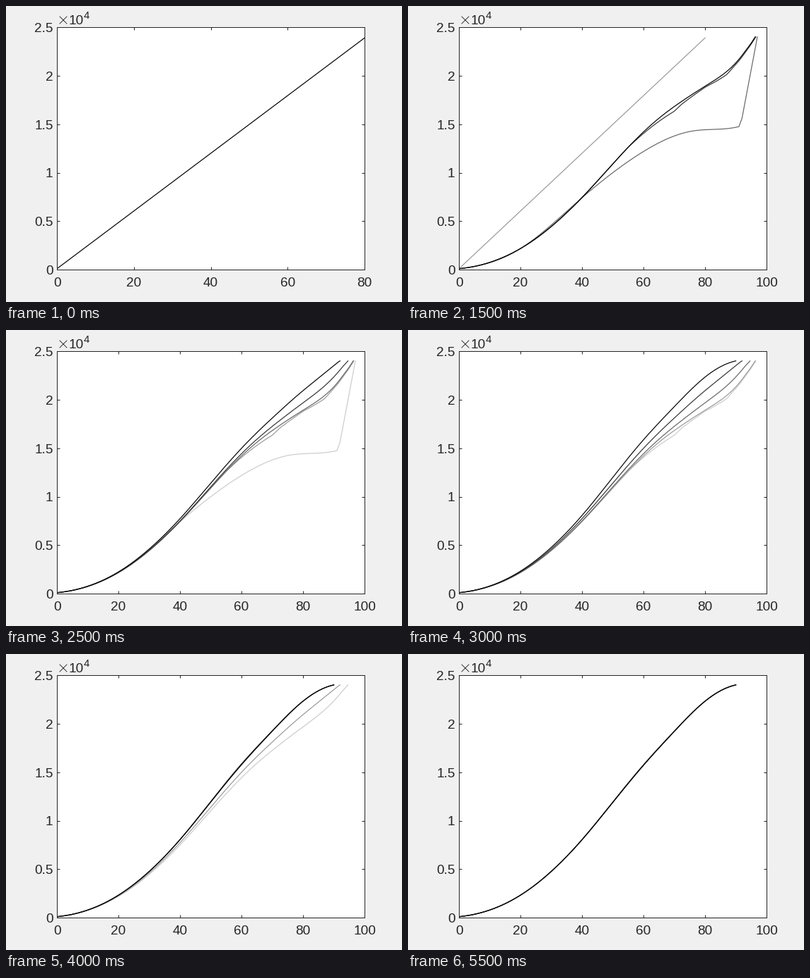
Write a matplotlib script that moves like this. It is 560x420 px and loops after 6 s.

```python
import numpy as np
import matplotlib.pyplot as plt
from matplotlib.animation import FuncAnimation
from matplotlib.lines import Line2D

W, H, DPI = 560, 420, 100
LEFT, RIGHT, TOP, BOTTOM = 72.1, 507.1, 30.1, 374.1
PX = 72 / DPI
INK = (0.15, 0.15, 0.15)
FADE = 0.2
FRAMES = 12

plt.rcParams["font.family"] = "Liberation Sans"


def spline(t, knots, first_slope, last_slope):
    """Cubic spline through (time, height / 1e4) knots with fixed end slopes."""
    x, y = np.array(knots, float).T
    h = np.diff(x)
    rise = np.diff(y) / h
    matrix = np.eye(len(x))
    rhs = np.full(len(x), first_slope)
    rhs[-1] = last_slope
    for j in range(1, len(x) - 1):
        matrix[j, j - 1:j + 2] = h[j], 2 * (h[j - 1] + h[j]), h[j - 1]
        rhs[j] = 3 * (h[j] * rise[j - 1] + h[j - 1] * rise[j])
    slope = np.linalg.solve(matrix, rhs)

    i = np.clip(np.searchsorted(x, t, side="right") - 1, 0, len(h) - 1)
    u = (t - x[i]) / h[i]
    v = 1 - u
    return (y[i] * v * v * (1 + 2 * u) + y[i + 1] * u * u * (3 - 2 * u)
            + h[i] * u * v * (slope[i] * v - slope[i + 1] * u))


def climb(end, lag=0, dip=0, lead=0):
    """Ideal climb, slowed by lag, sagging by dip near its end."""
    t = np.linspace(0, end, 400)
    ideal = [(0, 0.01), (20, 0.232), (40, 0.803), (50, 1.187),
             (60, 1.57), (70, 1.92), (80, 2.232), (90, 2.4)]
    y = spline(np.minimum(t * (1 - lag), 90), ideal, 0.003, 0.007)
    sag = dip * np.sin(np.pi * (t / end) ** 5.4)
    return t, y - sag + lead * np.exp(-((t - 58) / 14) ** 2)


def stalled():
    """Levels off halfway, then shoots straight up."""
    t = np.linspace(0, 91, 400)
    knots = [(0, 0.01), (20, 0.218), (40, 0.742), (50, 1.0),
             (60, 1.219), (76, 1.43), (91, 1.475)]
    y = spline(t, knots, 0.003, 0.008)
    return np.append(t, [92, 97]), np.append(y, [1.56, 2.4])


def notched():
    t, y = climb(96.5, 0.036, 0.285)
    notch = np.interp(t, [55, 70, 72.5, 80, 87, 89, 96],
                      [0, 0.05, 0.03, 0.012, 0.03, 0.015, 0])
    return t, y - notch


curves = [([0, 80], [0.01, 2.39]), stalled(), notched(),
          climb(96.3, 0.036, 0.285), climb(94.6, 0.033, 0.2),
          climb(92, 0.018, 0.1)]
curves += [climb(90, lead=0.018 * 0.65 ** n)
           for n in range(FRAMES - len(curves))]

fig = plt.figure(figsize=(W / DPI, H / DPI), dpi=DPI, facecolor="#f0f0f0")
ax = fig.add_axes([LEFT / W, 1 - BOTTOM / H,
                   (RIGHT - LEFT) / W, (BOTTOM - TOP) / H])
ax.set_ylim(0, 2.5)
ax.set_yticks(np.arange(0, 2.6, 0.5))
ax.tick_params(direction="in", length=4.4 * PX, width=PX, color=INK,
               top=True, right=True, labelbottom=False, labelleft=False)
for spine in ax.spines.values():
    spine.set(linewidth=PX, color=INK)


def label(x, baseline, text, ha="left", size=19):
    return fig.text(x / W, 1 - baseline / H, text, ha=ha, va="baseline",
                    fontsize=size * PX, color=INK)


for value in ax.get_yticks():
    y = BOTTOM - value / 2.5 * (BOTTOM - TOP)
    label(66.5, y + 6.9, f"{value:g}", "right")

label(88, 26, "10")
label(109.5, 18.5, "4", size=15)
for y0, y1 in ((15, 25), (25, 15)):
    fig.add_artist(Line2D([76 / W, 86 / W], [1 - y0 / H, 1 - y1 / H],
                          color=INK, linewidth=0.9 * PX))

x_labels = [label(0, 398, "", "center") for _ in range(6)]
lines = [ax.plot(t, y, linewidth=1.2 * PX)[0] for t, y in curves]


def draw(frame):
    x_max = 80 if frame == 0 else 100
    ax.set_xlim(0, x_max)
    ax.set_xticks(range(0, x_max + 1, 20))
    for i, text in enumerate(x_labels):
        value = 20 * i
        text.set_text(str(value) if value <= x_max else "")
        text.set_x((LEFT + value / x_max * (RIGHT - LEFT)) / W)
    for i, line in enumerate(lines):
        shade = FADE * (frame - i)
        line.set_visible(0 <= shade < 0.99)
        line.set_color((min(max(shade, 0), 1),) * 3)
    return lines + x_labels


anim = FuncAnimation(fig, draw, frames=FRAMES, interval=500,
                     repeat=True, repeat_delay=0, blit=False)
plt.show()
```
